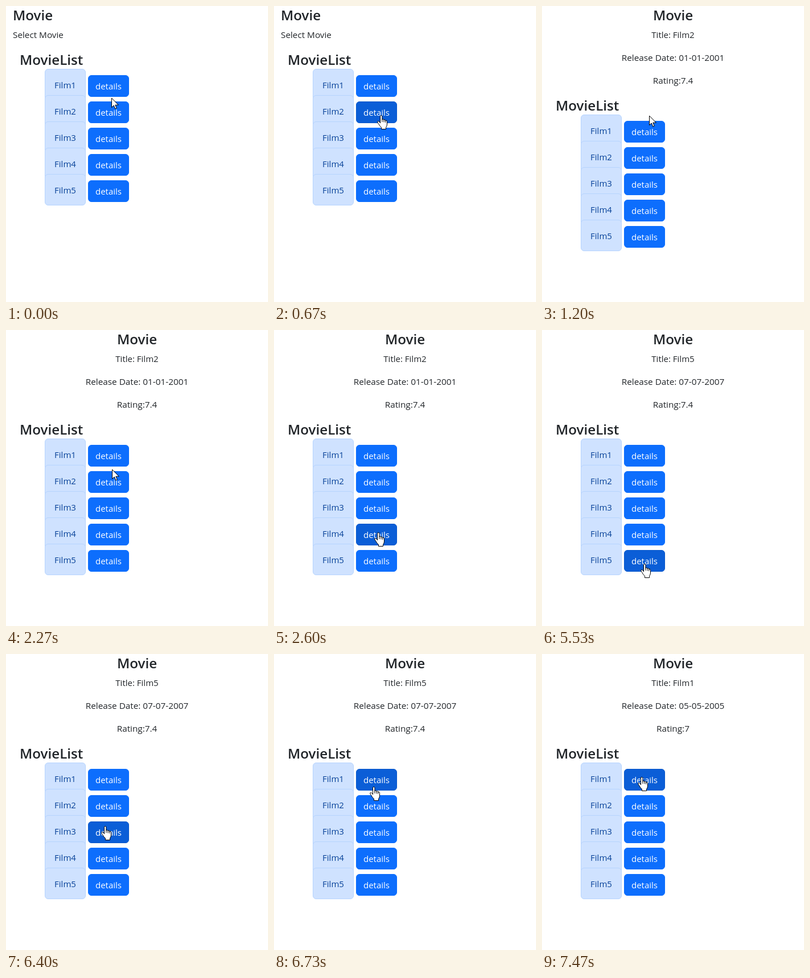
An HTML page for the animation above (8000 ms loop, 460x518 px).

```html
<!DOCTYPE html>
<html lang="en">
<head>
<meta charset="utf-8">
<title>Movie list</title>
<style>
  html, body { margin: 0; width: 100%; height: 100%; overflow: hidden; background: #fff; }
  svg { display: block; width: 460px; height: 518px; font: 15px "Open Sans", "Noto Sans", sans-serif; fill: #212529; }
  .head { font-size: 24.2px; font-weight: 600; }
  .para { font-size: 15.3px; }
  .mid { text-anchor: middle; }
  .film rect { fill: #cfe2ff; stroke: #b6d4fe; }
  .film text { fill: #084298; }
  .btn rect { fill: #0d6efd; stroke: #0d6efd; }
  .btn text { fill: #fff; font-weight: 500; }
  .btn.hover rect { fill: #0b5ed7; stroke: #0a58ca; }
  .cursor { fill: #fff; stroke: #000; stroke-linejoin: round; stroke-linecap: round; }
</style>
</head>
<body>
<svg viewBox="0 0 460 518">
  <g id="intro">
    <text class="head" x="12" y="25">Movie</text>
    <text class="para" x="12" y="56">Select Movie</text>
  </g>
  <g id="info" class="mid">
    <text class="head" x="230" y="25">Movie</text>
    <text id="title" x="230" y="56"></text>
    <text id="date" class="para" x="230" y="96"></text>
    <text id="rating" class="para" x="230" y="136"></text>
  </g>
  <g id="list">
    <text class="head" x="24" y="103">MovieList</text>
  </g>
  <path id="arrow" class="cursor" d="M.5 .5V16.5L4.2 13L6.8 19L9.3 18L6.8 12.2H12Z"/>
  <g id="hand" class="cursor">
    <path d="M5.5 13.5V2.3Q5.5 .5 7.2 .5T8.9 2.3V7.5Q10.3 6.4 12 8.2Q13.8 7.3 14.8 9.2Q17.5 8.8 17.5 11.5V16Q17.5 19 15.5 21.5V24.5H7.5V21.5Q4.5 19 2.8 15.5Q.2 12.5 .8 11.2Q2.6 9.2 5.5 13.5Z"/>
    <path fill="none" d="M8.9 7.5V11.5M12 8.2V12M14.8 9.2V12.5"/>
  </g>
</svg>
<script>
const LOOP = 8000, TICK = 200 / 3;
const PITCH = 46, SHIFT = 80;
const $ = id => document.getElementById(id);

// Detail panel: start time, title, release date, rating
const picks = [
  [1200, "Film2", "01-01-2001", "7.4"],
  [3400, "Film4", "11-11-2011", "9"],
  [5530, "Film5", "07-07-2007", "7.4"],
  [7470, "Film1", "05-05-2005", "7"]
];

const linear = p => p;
const smooth = p => p * p * (3 - 2 * p);
const easeOut = p => p * (2 - p);

// Pointer: tick, x, y, easing towards this stop
const stops = [
  [0, 185, 161, linear], [1, 187, 168, linear], [2, 187, 170, linear],
  [5, 187, 170, linear], [10, 188, 192, smooth],
  [31, 188, 192, linear], [39, 183, 355, smooth],
  [63, 183, 355, linear], [64, 183, 368, linear], [68, 182, 417, easeOut],
  [73, 182, 417, linear], [75, 180, 410, linear],
  [92, 180, 410, linear], [96, 174, 302, linear], [105, 175, 216, easeOut]
];

// Bordered box whose 1px border lies inside the given bounds
function addBox(cls, label, x, y, h, baseline) {
  const g = document.createElementNS("http://www.w3.org/2000/svg", "g");
  g.setAttribute("class", cls + " mid");
  g.innerHTML = `<rect x="${x + .5}" y="${y + .5}" width="71" height="${h - 1}" rx="5.5"/>` +
    `<text x="${x + 36}" y="${baseline}">${label}</text>`;
  $("list").append(g);
  return g;
}

const buttons = [0, 1, 2, 3, 4].map(i => {
  const y = i * PITCH;
  addBox("film", "Film" + (i + 1), 68, y + 110, 55, y + 144);
  return addBox("btn", "details", 144, y + 121, 38, y + 146);
});

function pointerAt(tick) {
  const next = stops.findIndex(s => s[0] > tick);
  if (next < 0) return stops[stops.length - 1].slice(1, 3);
  const a = stops[next - 1], b = stops[next];
  const p = b[3]((tick - a[0]) / (b[0] - a[0]));
  return [1, 2].map(i => Math.round(a[i] + (b[i] - a[i]) * p));
}

function show(el, on) { el.setAttribute("visibility", on ? "visible" : "hidden"); }

function render(t) {
  const pick = picks.filter(p => p[0] <= t).pop();
  const shift = pick ? SHIFT : 0;
  show($("intro"), !pick);
  show($("info"), pick);
  if (pick) {
    $("title").textContent = "Title: " + pick[1];
    $("date").textContent = "Release Date: " + pick[2];
    $("rating").textContent = "Rating:" + pick[3];
  }
  $("list").setAttribute("transform", `translate(0 ${shift})`);

  const [x, y] = pointerAt(Math.floor((t + 4) / TICK));
  let over = false;
  buttons.forEach((b, i) => {
    const top = 121 + shift + i * PITCH;
    const hit = x >= 144 && x < 216 && y >= top && y < top + 38;
    b.classList.toggle("hover", hit);
    over = over || hit;
  });
  show($("hand"), over);
  show($("arrow"), !over);
  $("hand").setAttribute("transform", `translate(${x - 7} ${y - 1})`);
  $("arrow").setAttribute("transform", `translate(${x} ${y})`);
}

const start = performance.now();
function frame() {
  render((performance.now() - start) % LOOP);
  requestAnimationFrame(frame);
}
frame();
</script>
</body>
</html>
```
